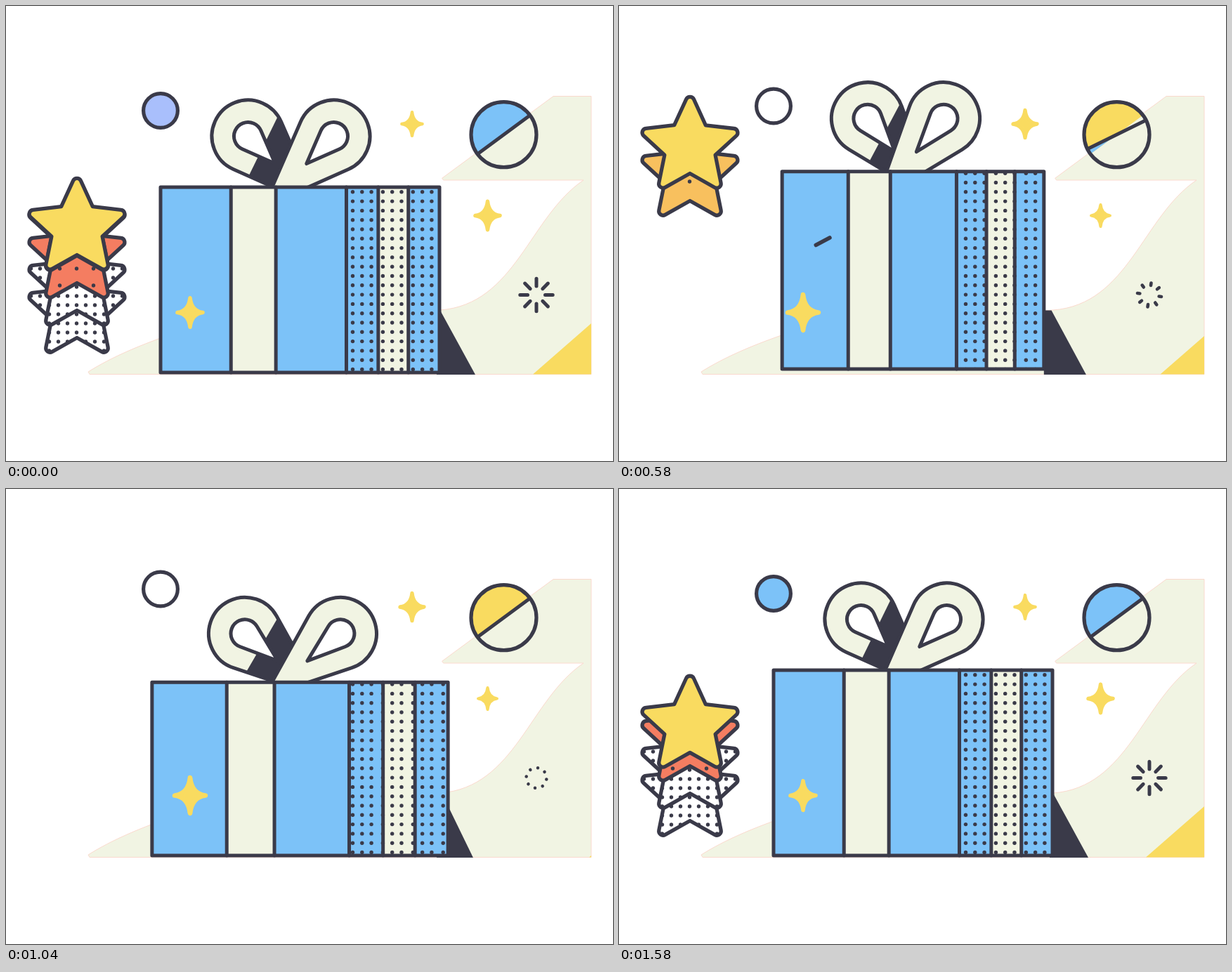
Write an HTML page with a canvas that moves like this. It is 864 px wide and 648 px high and loops after 1.62 s.

```html
<!DOCTYPE html>
<html lang="en">
<head>
<meta charset="utf-8">
<title>Gift box</title>
<style>
  html, body { margin: 0; width: 100%; height: 100%; overflow: hidden; background: #fff; }
  canvas { display: block; }
</style>
</head>
<body>
<canvas id="stage" width="864" height="648"></canvas>
<script>
const ctx = document.getElementById('stage').getContext('2d');
const LOOP = 1620, FRAMES = 39;
const TAU = Math.PI * 2, DEG = Math.PI / 180;
const INK = '#3a3a49', BLUE = '#7cc2f8', CREAM = '#f1f4e3', YELLOW = '#f9db60',
      LILAC = '#a9bffc', WHITE = '#fff';

// Easing over a span of frames
const part = (f, from, to) => Math.min(1, Math.max(0, (f - from) / (to - from)));
const ease = (f, from, to) => 0.5 - 0.5 * Math.cos(part(f, from, to) * Math.PI);
const cubic = p => p < 0.5 ? 4 * p ** 3 : 1 - 4 * (1 - p) ** 3;
const back = p => 3 * p ** 3 - 2 * p ** 2;
const wave = f => Math.cos(f / FRAMES * TAU);

function paint(fill, stroke, width = 5) {
  if (fill) { ctx.fillStyle = fill; ctx.fill(); }
  if (stroke) { ctx.strokeStyle = stroke; ctx.lineWidth = width; ctx.stroke(); }
}

function poly(...pts) {
  ctx.beginPath();
  pts.forEach(([x, y]) => ctx.lineTo(x, y));
  ctx.closePath();
}

function line(x1, y1, x2, y2, width = 5) {
  ctx.beginPath();
  ctx.moveTo(x1, y1);
  ctx.lineTo(x2, y2);
  paint(null, INK, width);
}

function disc(x, y, r) {
  ctx.beginPath();
  ctx.arc(x, y, r, 0, TAU);
}

function dot(x, y) {
  disc(x, y, 2.7);
  paint(INK);
}

function ground() {
  ctx.beginPath();
  ctx.moveTo(621, 245);
  ctx.lineTo(779, 128.5);
  ctx.lineTo(833, 128.5);
  ctx.lineTo(833, 524.5);
  ctx.lineTo(119, 524.5);
  ctx.lineTo(117, 521);
  ctx.bezierCurveTo(150, 500, 195, 481, 240, 466);
  ctx.lineTo(560, 437);
  ctx.lineTo(618, 433);
  ctx.bezierCurveTo(725, 425, 745, 300, 822, 248);
  ctx.lineTo(623, 248);
  ctx.closePath();
  paint(CREAM, '#fbd6ca', 0.9);
}

function corner(f) {
  const size = f < 23.5 ? 1 - ((f + 2) / 25.5) ** 3 : ease(f, 23.5, 36);
  poly([833, 524.5], [833 - 83 * size, 524.5], [833, 524.5 - 72.5 * size]);
  paint(YELLOW);
}

// The gift stretches upwards, drops into a squash, then settles
function giftPose(f) {
  const s = ease(f, 8.6, 18) - 1.82 * ease(f, 18, 22) + 0.82 * ease(f, 22, 31);
  const lift = Math.max(0, s), bend = Math.abs(s);
  const half = 198.5 - 19.75 * s, bottom = 522 - 8 * lift;
  return { s, lift, bend, bottom, left: 418.5 - half, right: 418.5 + half, top: bottom - 264 - 28 * s };
}

function shadow({ s, bend, right }) {
  const left = Math.min(right, 613);
  poly([left, 433.5], [618 - 4 * s, 433.5], [668 - 5 * bend, 525], [left, 525]);
  paint(INK);
}

function teardrop(x, y, r, reach, angle) {
  const q = Math.PI / 2 - Math.asin(r / reach);
  ctx.beginPath();
  ctx.arc(x, y, r, angle + q, angle - q + TAU);
  ctx.lineTo(x + reach * Math.cos(angle), y + reach * Math.sin(angle));
  ctx.closePath();
}

function bow({ s, lift, bend, top }) {
  const mid = 405.5 + 4 * bend, spread = 61 - 11.3 * s;
  const x = mid - spread, y = top - 72.5 - 5 * s, a = (45.25 + 9 * s) * DEG;
  const outer = cx => teardrop(cx, y, 51.5, 142 + 17 * lift, cx < mid ? a : Math.PI - a);
  const inner = cx => teardrop(cx, y, 20, 55 + 10 * bend, cx < mid ? a : Math.PI - a);

  outer(x);
  paint(INK);
  // Light side of the fold
  const ax = 42.5 + 8 * bend, ay = 8 * bend - 28.5, bx = 2, by = 54.5 + 12 * lift;
  ctx.save();
  poly([x + 2 * ax - bx, y + 2 * ay - by], [x + 2 * bx - ax, y + 2 * by - ay], [x - 200, y + 150], [x - 200, y - 150]);
  ctx.clip();
  outer(x);
  paint(CREAM);
  ctx.restore();
  outer(x);
  paint(null, INK);
  inner(x);
  paint(WHITE, INK);

  outer(mid + spread);
  paint(CREAM, INK);
  inner(mid + spread);
  paint(WHITE, INK);
}

function box({ left, right, top, bottom }) {
  const cuts = [0, 0.2525, 0.4135, 0.6662, 0.7805, 0.8885, 1].map(c => left + c * (right - left));
  for (let i = 0; i < 6; i++) {
    ctx.save();
    ctx.beginPath();
    ctx.rect(cuts[i], top, cuts[i + 1] - cuts[i], bottom - top);
    paint(i % 3 === 1 ? CREAM : BLUE);
    ctx.clip();
    // Dot columns stand still in groups of three
    for (let n = 0; i > 2 && n < 12; n++) {
      const x = 493.5 + 42.9 * Math.floor(n / 3) + 13.3 * (n % 3);
      for (let y = 517.5; y > top; y -= 13.3) dot(x, y);
    }
    ctx.restore();
  }
  cuts.slice(1, 6).forEach(x => line(x, top, x, bottom));
  ctx.strokeRect(left, top, right - left, bottom - top);
}

function dash(f) {
  const head = ease(f, 11.8, 20), tail = ease(f, 17.2, 24);
  if (head <= 0 || tail >= 1) return;
  line(300 - 118 * tail, 330 + 63 * tail, 300 - 118 * head, 330 + 63 * head, 5.5);
}

function sparkle(x, y, w) {
  ctx.save();
  ctx.translate(x, y);
  ctx.scale(w / 21, w / 21);
  ctx.beginPath();
  ctx.moveTo(0, -20.8);
  ctx.quadraticCurveTo(2, -2, 18, 0);
  ctx.quadraticCurveTo(2, 2, 0, 20.8);
  ctx.quadraticCurveTo(-2, 2, -18, 0);
  ctx.quadraticCurveTo(-2, -2, 0, -20.8);
  ctx.closePath();
  paint(YELLOW, YELLOW, 5.6);
  ctx.restore();
}

function burst(f) {
  const shut = ease(f, 9, 17) - ease(f, 30, 37);
  ctx.save();
  ctx.translate(755, 411.5);
  ctx.rotate(90 * ease(f, 8, 38.5) * DEG);
  for (let i = 0; i < 8; i++) {
    line(12.5 + 1.9 * shut, 0, 23.2 - 8.7 * shut, 0, 5 - 0.5 * shut);
    ctx.rotate(TAU / 8);
  }
  ctx.restore();
}

function sector(from, to, fill) {
  ctx.beginPath();
  ctx.moveTo(0, 0);
  ctx.arc(0, 0, 46.5, from * DEG, to * DEG);
  ctx.closePath();
  paint(fill);
}

// Half a turn that swings 12 degrees too far and back
const halfTurn = f => 192 * cubic(part(f, 5.2, 13)) - 12 * ease(f, 13, 17);

function ball(f) {
  const turn = halfTurn(f) + halfTurn(f - 20.3), start = 143.6;
  const tones = Math.floor(turn / 180) % 2 ? [YELLOW, BLUE] : [BLUE, YELLOW];
  ctx.save();
  ctx.translate(708.5, 183.2);
  disc(0, 0, 46.5);
  paint(CREAM);
  sector(start, start + 180, tones[0]);
  sector(start, start + turn % 180, tones[1]);
  disc(0, 0, 46.5);
  paint(null, INK, 5.2);
  ctx.rotate((start + turn) * DEG);
  line(-45, 0, 45, 0);
  ctx.restore();
}

function bubble(f) {
  const y = 145 + 4 * wave(f), early = f < 14;
  disc(220, y, 24.4);
  paint(early ? LILAC : WHITE);
  disc(220, y, 24.4 * (early ? ease(f, 4.5, 12.5) : ease(f, 30, 36)));
  paint(early ? WHITE : BLUE);
  disc(220, y, 24.4);
  paint(null, INK, 5.2);
}

function starPath() {
  const at = (r, k) => [r * Math.sin(k * TAU / 10), 7 - r * Math.cos(k * TAU / 10)];
  ctx.beginPath();
  ctx.moveTo(...at(38, -1));
  for (let k = 0; k < 10; k += 2) {
    ctx.arcTo(...at(79.5, k), ...at(38, k + 1), 6);
    ctx.lineTo(...at(38, k + 1));
  }
  ctx.closePath();
}

function star(y, fill, size = 1, turn = 0, dots) {
  ctx.save();
  ctx.translate(101, y);
  ctx.rotate(turn * DEG);
  ctx.scale(size, size);
  starPath();
  paint(fill);
  if (dots) {
    const { cols, rows, gap, top } = dots;
    ctx.save();
    ctx.clip();
    for (let i = 0; i < cols * rows; i++)
      dot((i % cols - (cols - 1) / 2) * gap - 0.5, top + Math.floor(i / cols) * gap);
    ctx.restore();
    starPath();
  }
  paint(null, INK, 5.3);
  ctx.restore();
}

const STEP = 39, FLOOR = 427.5;
const dense = { cols: 11, rows: 10, gap: 13, top: -53.5 };
const trail = [
  { fill: WHITE, dots: dense },
  { fill: WHITE, dots: dense },
  { fill: '#f47d61', dots: { cols: 3, rows: 2, gap: 24, top: 24.5 } },
  { fill: '#f3955f', dots: { cols: 2, rows: 1, gap: 28, top: 39.5 } },
  { fill: '#f6ab5f' },
  { fill: '#f8c05e', dots: { cols: 1, rows: 1, gap: 0, top: 17.5 } }
];

// The star pops up, climbs over its trail, then spins away
function stars(f) {
  const t = f < 24 ? f + FRAMES : f;
  const rise = 6 * STEP * ease(t, 30.2, 47.7);
  trail.forEach(({ fill, dots }, k) => {
    if (rise > k * STEP + 1 && t < 43.5 + 2 * k) star(FLOOR - k * STEP, fill, 1, 0, dots);
  });
  const size = 1 - back(1 - part(t, 26.7, 35.2)) - back(part(t, 53, 61.5));
  const turn = 9 * Math.max(0, (t - 52) / 5) ** 3;
  if (size > 0.01) star(FLOOR - rise, YELLOW, size, turn);
}

function draw(f) {
  ctx.fillStyle = WHITE;
  ctx.fillRect(0, 0, 864, 648);
  ctx.lineCap = ctx.lineJoin = 'round';
  const w = wave(f), gift = giftPose(f);
  ground();
  corner(f);
  shadow(gift);
  bow(gift);
  box(gift);
  dash(f);
  sparkle(578, 168, 18.75 - 1.75 * w);
  sparkle(685.5, 298.5, 17.5 + 3 * w);
  sparkle(262, 436.5, 23.75 - 2.75 * w);
  burst(f);
  ball(f);
  bubble(f);
  stars(f);
}

// The motion runs in steps of 24 per second
function tick() {
  const t = performance.now() % LOOP;
  draw(Math.min(FRAMES - 1, Math.floor((t + 4) * 0.024)));
  requestAnimationFrame(tick);
}
tick();
</script>
</body>
</html>
```
